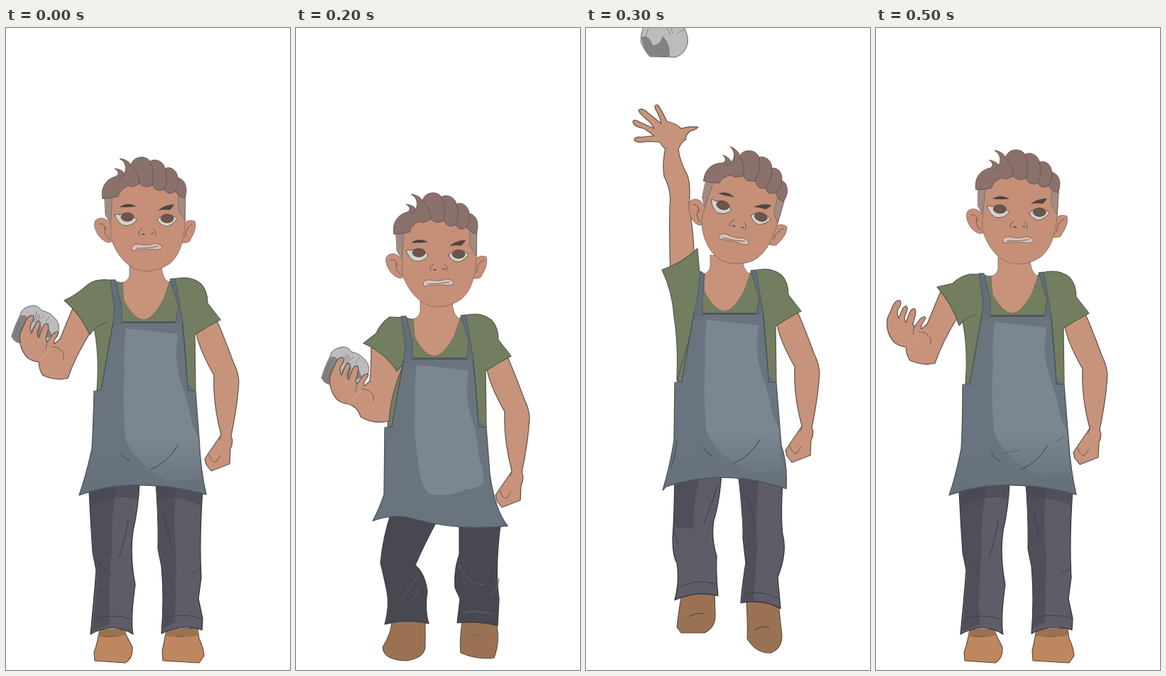
Recreate the animation shown at these times as an HTML page. Size 400 px wide and 900 px high, loop 0.6 s.

```html
<!DOCTYPE html>
<html lang="en">
<head>
<meta charset="utf-8">
<title>Stone throw</title>
<style>
html, body { margin: 0; width: 100%; height: 100%; overflow: hidden; background: #fff; }
svg { display: block; width: 100vw; height: 100vh; }
.pose { visibility: hidden; animation: show 600ms step-end calc(var(--i) * 100ms - 600ms) infinite; }
@keyframes show { 0% { visibility: visible; } 16.666%, 100% { visibility: hidden; } }
path { stroke-linejoin: round; stroke-linecap: round; }
.skin { fill: #c7937b; stroke: #5f514b; stroke-width: 1.2; }
.neck { fill: #c7937b; stroke: #80695d; stroke-width: .8; }
.face { fill: #c58f78; stroke: #80695d; stroke-width: .8; }
.hair { fill: #8a716c; stroke: #66544f; stroke-width: .9; }
.side { fill: #a18b83; stroke: #76645c; stroke-width: .7; }
.dark { fill: #50443f; stroke: none; }
.iris { fill: #6d544d; stroke: #54413c; stroke-width: .8; }
.white { fill: #d3d2ca; stroke: #5f5450; stroke-width: .9; }
.lips { fill: #dcc1b9; stroke: #7d625a; stroke-width: .9; }
.shirt { fill: #737d60; stroke: #55594c; stroke-width: 1.2; }
.apron { fill: #69747e; stroke: #4c535b; stroke-width: 1.3; }
.strap { fill: #636e7a; stroke: #535b63; stroke-width: 1.1; }
.glow { fill: #7a8690; stroke: none; }
.fade { fill: url(#fade); stroke: none; }
.jeans { fill: #5d5c67; stroke: #303036; stroke-width: 1.2; }
.shade { fill: #4f4f5a; stroke: none; }
.night { fill: #484850; stroke: #3d3d44; stroke-width: 1.2; }
.tan { fill: #bd875f; stroke: #5c4332; stroke-width: 1.1; }
.top { fill: #9c7150; stroke: none; }
.brown { fill: #9a7253; stroke: #574a42; stroke-width: 1.1; }
.rock { fill: #bcbcbc; stroke: #666; stroke-width: 1; }
.dim { fill: #828282; stroke: none; }
.line { fill: none; stroke: #68564f; stroke-width: .9; }
.ink { fill: none; stroke: #39414a; stroke-width: 1; }
.soft { fill: none; stroke: #666670; stroke-width: 1; }
</style>
</head>
<body>
<svg viewBox="0 0 400 900" preserveAspectRatio="none">
<defs>
  <linearGradient id="fade" gradientUnits="userSpaceOnUse" x1="0" y1="575" x2="0" y2="645">
    <stop offset="0" stop-color="#7a8690"/><stop offset="1" stop-color="#69747e"/>
  </linearGradient>
  <linearGradient id="hem" gradientUnits="userSpaceOnUse" x1="0" y1="590" x2="0" y2="654">
    <stop offset="0" stop-color="#69747e"/><stop offset="1" stop-color="#66717c"/>
  </linearGradient>

  <g id="head">
    <path class="face" d="M148 276C143 267 133 263 126 270C121 278 130 296 142 300Q147 302 150 298ZM249 275Q257 267 266 271Q269 282 260 296Q259 302 248 301Z"/>
    <path class="face" d="M148 232V274Q146 285 148 296Q155 315 166 326Q180 341 197 341Q215 341 231 330Q245 318 249 296Q254 275 252 232L200 210Z"/>
    <path class="side" d="M139 237L150 235L147 274L140 262ZM243 235L253 237L252 270L243 256Z"/>
    <path class="hair" d="M136 239C133 225 140 213 152 209C160 207 160 201 153 197C162 198 166 202 167 204C170 195 169 189 160 183C170 184 176 190 176 193C178 180 196 177 203 187C210 182 222 187 224 197C232 193 241 200 242 210C252 212 257 224 252 238Q246 239 238 229Q228 236 223 226Q212 232 206 220Q196 226 188 218Q176 225 172 221Q160 226 158 236Q146 240 136 239Z"/>
    <path class="line" d="M176 193Q187 201 188 218M203 187Q210 203 206 220M224 197Q229 212 223 226M242 210Q244 222 238 229M167 204Q164 209 160 210M131 275Q138 272 141 283M139 280Q137 290 146 296M262 275Q254 278 252 293"/>
    <path class="dark" d="M160 251Q171 243 184 250Q172 252 160 251ZM214 256Q222 248 237 247Q235 251 231 255Q222 254 214 256Z"/>
    <path class="white" d="M153 262Q156 260 160 262C168 258 180 262 184 269Q178 278 166 277Q157 273 153 262ZM213 269C218 262 228 259 238 265Q242 267 239 270Q232 278 225 278Q217 276 213 269Z"/>
    <ellipse class="iris" cx="171" cy="265" rx="9" ry="6"/>
    <ellipse class="iris" cx="227" cy="267" rx="9" ry="6"/>
    <path class="line" d="M188 291Q184 286 192 281M207 281Q213 286 210 291"/>
    <path class="dark" d="M191 290Q193 286 196 290ZM204 289Q206 285 208 288Z"/>
    <path class="lips" d="M177 310Q177 303 186 303Q199 306 210 302Q219 303 220 308Q216 312 206 310Q190 310 180 312Z"/>
    <path class="line" d="M183 309Q200 309 214 306"/>
  </g>

  <g id="body">
    <path class="skin" d="M268 428Q272 450 293 487Q291 525 303 570Q298 578 288 592L280 604L282 612L289 621L315 611L316 590Q321 580 317 572Q326 530 328 495Q327 482 320 468Q306 430 296 408"/>
    <path class="line" d="M286 598Q290 610 296 608L302 599M303 570L301 577"/>
    <path class="shirt" d="M150 354L160 357H228L236 352Q258 346 274 358Q284 368 284 386L302 409Q284 418 266 430L267 508H128Q132 460 124 420L130 356Z"/>
  </g>
  <path id="sleeve" class="shirt" d="M150 354Q128 350 115 360Q100 374 82 382Q104 400 118 430L126 420L142 412"/>
  <path id="neck" class="neck" d="M174 330V347Q172 355 164 357L166 382Q180 409 195 409Q208 407 222 380L230 357Q219 352 219 330"/>
  <g id="bib">
    <path class="apron" d="M134 508L151 412H247Q254 470 256 508"/>
    <path class="strap" d="M163 413H239L243 390L231 352L238 351L249 413Q254 470 256 508L267 509"/>
    <path fill="#69747e" d="M124 509L134 508L151 414L248 414L256 508L267 509V513H124Z"/>
    <path class="ink" stroke-opacity=".6" d="M124 509L134 508L151 412M163 413H239M248 414Q254 470 256 508L267 509"/>
  </g>
  <path id="strap" class="strap" d="M150 420L153 395L147 353L154 353L163 390V415"/>
  <path id="glow" class="glow" d="M169 421Q200 424 242 429Q236 465 246 496Q255 520 257 552Q264 570 263 587Q252 596 237 596Q212 608 187 602Q173 590 172 562Q164 520 167 482Q165 450 169 421Z"/>
  <path id="glowLong" class="fade" d="M169 421Q200 424 242 429Q236 465 246 496Q258 530 262 555L271 575Q272 600 276 632L230 636Q180 610 168 575Q164 520 167 482Q165 450 169 421Z"/>
  <path id="creases" class="ink" d="M162 596Q167 604 174 607M204 619Q228 609 242 585"/>

  <g id="rock">
    <path class="rock" d="M8 432Q12 418 20 402Q22 391 38 389Q46 389 50 396Q62 398 70 408Q76 415 74 424Q74 434 66 438Q50 444 30 442Q12 444 8 432Z"/>
    <path class="dim" d="M9 432Q13 416 21 403Q30 402 30 407L26 418L24 441Q11 443 9 432ZM36 424L44 410L50 418L46 436ZM53 436L60 420L65 432Z"/>
    <path class="line" stroke-opacity=".6" d="M39 412L43 398M42 411L45 401M46 411L47 402M49 408L53 403M56 412L61 404M12 434L19 412M16 438L21 419"/>
  </g>
  <g id="hand">
    <path class="skin" d="M76 436L68 443Q66 439 74 428Q73 423 66 429L58 440Q55 437 57 432Q61 420 59 415Q54 413 51 421L46 434Q43 429 45 424Q50 414 47 411Q43 410 40 418L36 428Q33 422 35 415Q41 407 38 403Q32 402 28 410Q24 420 20 428Q17 448 30 462Q38 468 46 468"/>
    <path class="line" d="M58 440L56 450M64 447Q74 446 81 456V464"/>
  </g>
  <g id="bent">
    <path class="skin" d="M46 468Q47 481 52 487Q70 495 87 491Q98 460 118 428L118 400L96 388Q86 412 76 436"/>
    <use href="#hand"/>
  </g>
  <path id="open" class="skin" d="M112 170Q106 164 104 160L88 159Q70 162 68 157Q68 152 78 153L96 151L82 141Q66 138 66 131Q68 127 76 132L96 141L90 132Q74 119 74 115Q79 111 86 118L106 134Q104 124 97 112Q97 107 101 108Q106 114 114 131Q126 133 134 141Q146 137 158 139Q156 142 146 145Q139 152 141 156Q134 160 130 170"/>

  <g id="legs">
    <path class="tan" d="M132 843Q128 865 124 875L125 887L168 890Q179 884 178 868Q172 856 165 843ZM226 843Q222 865 220 872L221 887L272 890L279 880Q278 868 272 856L270 841Z"/>
    <path class="top" d="M132 844H168L170 851Q150 856 130 853ZM226 842H270L272 851Q250 856 225 852Z"/>
    <path class="line" d="M138 852Q146 855 154 852M240 853H251"/>
    <path class="jeans" d="M117 648Q119 690 122 735L127 760Q124 800 119 850Q150 832 179 850Q175 830 182 780Q174 740 179 705Q187 670 188 636ZM211 636Q215 690 214 730L219 755Q223 800 219 849Q250 834 276 844L277 828L271 800L275 770Q272 720 277 646Z"/>
    <path class="shade" d="M118 648L156 640Q147 690 149 735Q143 790 146 836L122 845L129 760L122 735ZM212 639L241 638Q234 690 240 740L238 833L221 842Q223 800 220 755L215 730Z"/>
    <path fill="#484853" opacity=".6" d="M118 646L188 638L185 660Q150 654 119 670ZM211 638L276 650L275 670Q245 655 213 660Z"/>
    <path class="ink" d="M130 748Q138 760 148 765M172 690Q168 720 159 742M222 680Q226 705 232 720M128 827Q150 821 175 828M224 828Q248 818 275 828M262 764Q270 762 275 756"/>
  </g>
  <g id="nightLegs">
    <path class="night" d="M120 648Q114 700 115 730Q118 755 125 766Q118 780 120 795Q126 812 130 825L124 868Q150 855 180 861Q175 835 181 805Q177 785 172 767Q182 735 180 715L181 656ZM217 660Q220 700 218 725Q218 745 225 766Q219 780 217 800L222 830L219 862Q255 853 273 869L266 825Q280 800 278 785Q274 775 270 770Q284 745 282 710L280 660Z"/>
    <path class="brown" d="M127 865Q123 878 126 891Q148 895 165 887Q180 880 177 866Q165 852 150 852Q133 854 127 865ZM223 865Q219 878 222 887Q245 893 272 891V872Q268 855 248 853Q230 855 223 865Z"/>
    <path class="soft" d="M125 766L131 776M172 767L173 773M225 766L230 771M262 776Q273 774 277 766M138 846Q150 841 165 846M235 846Q250 841 265 846"/>
  </g>
</defs>

<g class="pose" style="--i:0">
  <use href="#legs"/>
  <use href="#body"/>
  <use href="#rock"/>
  <use href="#bent"/>
  <use href="#sleeve"/>
  <use href="#neck"/>
  <path class="apron" style="fill:url(#hem)" d="M124 509Q123 555 121 590Q112 630 103 655Q180 627 282 654Q274 620 272 575L267 509"/>
  <use href="#bib"/><use href="#strap"/><use href="#glowLong"/><use href="#creases"/>
  <use href="#head"/>
</g>

<g class="pose" style="--i:1">
  <use href="#nightLegs"/>
  <g transform="translate(-7 18)">
    <use href="#body"/>
    <use href="#rock" y="-4"/>
    <use href="#bent"/>
    <use href="#sleeve"/>
    <use href="#neck"/>
  </g>
  <path class="apron" d="M117 527L114 622Q108 640 95 658Q118 650 152 656Q220 674 286 666Q272 650 269 612L260 527"/>
  <g transform="translate(-7 18)"><use href="#bib"/><use href="#strap"/><use href="#glow"/></g>
  <use href="#head" transform="translate(-6.500 16)"/>
</g>

<g class="pose" style="--i:2">
  <path class="brown" d="M135 830Q135 848 122 868Q123 886 155 887Q180 884 182 868V830ZM234 832Q230 862 232 876Q255 886 279 883Q288 860 282 832Z"/>
  <path class="night" d="M135 676Q122 715 119 750Q124 770 128 790Q132 810 125 836Q155 828 187 835Q181 815 185 790Q182 765 168 753Q180 725 199 690ZM230 696V738Q222 760 224 785L231 800L227 834Q258 831 284 838L286 800Q280 760 288 696Z"/>
  <path class="soft" d="M147 800Q162 786 172 766M163 804Q170 795 171 787M229 752Q240 780 266 781M275 794Q284 788 286 772M235 820Q255 815 276 822M247 852Q254 850 260 852"/>
  <use href="#body" x="1" y="51"/>
  <use href="#rock" x="28" y="58"/>
  <path class="skin" d="M74 527Q88 532 91 545Q108 556 131 551Q133 515 150 475L106 446Q106 475 104 495"/>
  <use href="#hand" x="28" y="59"/>
  <path class="shirt" d="M151 406L132 405Q118 415 113 428L95 442Q125 455 142 481L150 472"/>
  <use href="#neck" x="1" y="51"/>
  <path class="apron" d="M125 560L124 654Q117 675 108 691Q138 680 165 688Q230 706 298 698Q280 675 273 625L268 560"/>
  <g transform="translate(1 51)"><use href="#bib"/><use href="#strap"/><use href="#glow"/></g>
  <use href="#head" transform="translate(2 50)"/>
</g>

<g class="pose" style="--i:3">
  <path class="brown" d="M135 792Q130 820 128 840L134 848H167Q183 840 182 822L181 788ZM226 804Q228 840 227 856Q240 877 260 876Q276 870 276 852L271 806Z"/>
  <path class="jeans" d="M125 628Q124 690 122 715Q122 740 128 750Q132 775 125 802Q155 788 186 796Q183 770 184 740Q176 715 180 690Q188 665 191 624ZM214 624Q222 680 221 715L225 750Q220 780 218 806Q250 800 274 814L270 770Q284 735 277 710Q274 690 277 630Z"/>
  <path class="shade" d="M126 636L160 630Q150 670 152 702L124 700ZM215 630H244Q238 680 241 730L236 803L220 804L226 750L222 715Z"/>
  <path class="ink" d="M124 703L129 722M186 640Q176 670 166 695M226 655Q232 680 239 695M134 783Q158 771 184 780M224 794Q250 787 273 801M145 825Q156 819 166 821M237 844Q248 837 258 840"/>
  <path class="rock" d="M84-8Q75 10 78 22Q84 34 90 40L126 41Q140 36 143 22Q145 8 134-8Z"/>
  <path class="dim" d="M78 13Q88 8 94 24Q104 25 108 11Q119 22 118 40H91Q81 32 78 13Z"/>
  <path class="line" stroke-opacity=".6" d="M114 0L119 9M120 0L122 7M128 8L138 2M84 12L88 0"/>
  <use href="#body" x="1" y="-12"/>
  <path class="skin" d="M112 168Q107 190 110 208Q121 228 118 250Q117 300 119 345L152 320Q152 285 145 252Q148 220 143 207Q131 185 130 168"/>
  <use href="#open"/>
  <path class="shirt" d="M160 344L157 309Q135 330 107 339Q122 370 124 405Q130 440 128 495L150 420"/>
  <use href="#neck" x="1" y="-12"/>
  <path class="apron" style="fill:url(#hem)" d="M125 497L124 578Q118 615 108 648L113 643Q195 616 282 646Q284 610 275 585L268 497"/>
  <g transform="translate(1 -12)">
    <use href="#bib"/>
    <path class="strap" d="M150 420L156 390L160 353L166 357L163 390V415"/>
    <use href="#glowLong"/>
  </g>
  <use href="#creases" x="3" y="-8"/>
  <path class="ink" d="M128 578Q126 600 120 616"/>
  <use href="#head" transform="translate(10 -11) rotate(15 198 307)"/>
</g>

<g class="pose" style="--i:4">
  <use href="#nightLegs"/>
  <use href="#body" x="-10" y="24"/>
  <path class="skin" d="M54 262Q42 295 44 318Q47 342 63 366Q75 385 96 413L114 382Q95 358 77 341Q80 320 75 305Q72 285 75 261"/>
  <use href="#open" transform="translate(-54 94) rotate(9 122 152)"/>
  <path class="shirt" d="M142 377Q123 379 108 370Q100 400 87 424Q105 430 117 445L130 442"/>
  <path class="line" d="M121 379Q125 392 133 400"/>
  <use href="#neck" x="-10" y="24"/>
  <path class="apron" d="M114 533L112 625Q107 642 95 659Q118 650 152 656Q220 674 286 666Q272 650 268 620L257 533"/>
  <g transform="translate(-10 24)"><use href="#bib"/><use href="#strap"/><use href="#glow"/></g>
  <use href="#head" transform="translate(-6 25) rotate(3.500 198 307)"/>
</g>

<g class="pose" style="--i:5">
  <use href="#legs"/>
  <use href="#body" x="-2" y="-9"/>
  <use href="#bent" x="-4" y="-21"/>
  <path class="shirt" d="M148 345H132Q118 348 108 358L86 363Q108 388 117 417L126 408L140 402"/>
  <use href="#neck" x="-2" y="-9"/>
  <path class="apron" style="fill:url(#hem)" d="M122 500Q122 555 120 590Q112 630 103 655Q180 627 282 654Q274 620 271 575L265 500"/>
  <g transform="translate(-2 -9)"><use href="#bib"/><use href="#strap"/><use href="#glowLong"/></g>
  <use href="#creases"/>
  <path class="ink" stroke-opacity=".5" d="M180 596L202 592M252 580L266 573"/>
  <use href="#head" transform="translate(1.500 -10) rotate(2.500 198 307)"/>
</g>
</svg>
</body>
</html>
```
